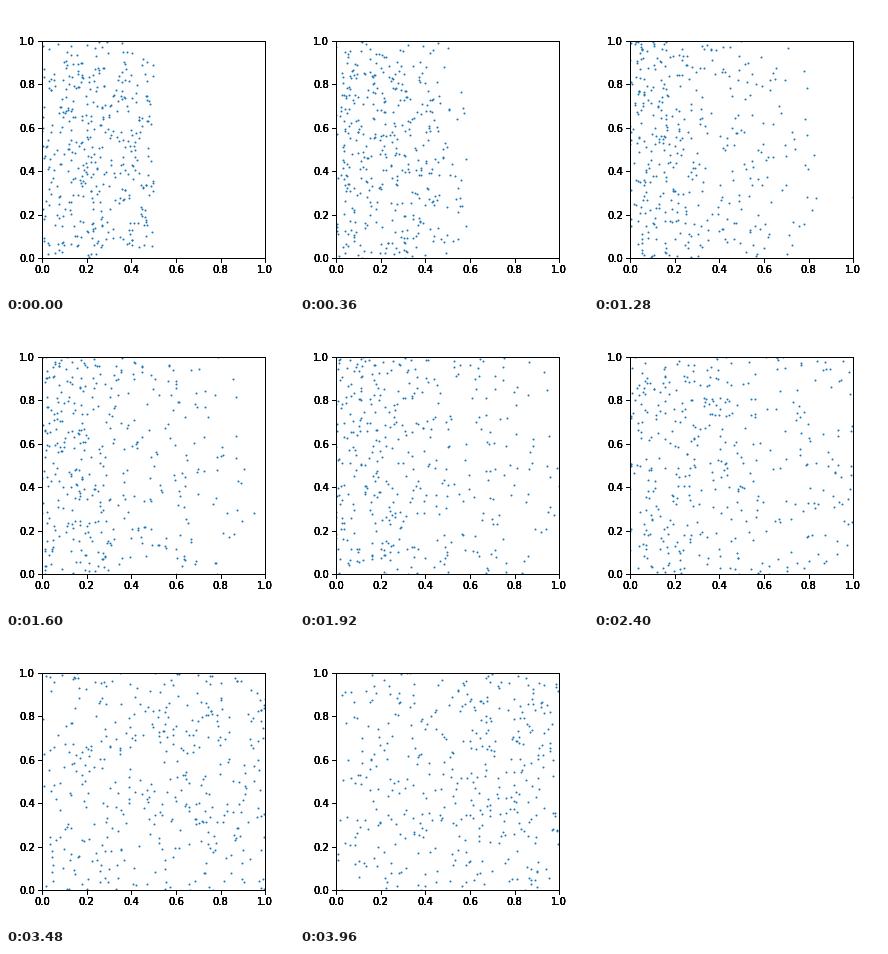
A matplotlib script that plays this animation: 288 px wide and 288 px high, repeating every 4 s.

```python
import numpy as np
import matplotlib.pyplot as plt
from matplotlib.animation import FuncAnimation

COUNT = 400
FRAMES = 100
SPEED = 0.0105      # distance per step
DIAMETER = 0.003
INK_LAYERS = 5      # repeated label passes give the heavy type

rng = np.random.default_rng(8)


def start():
    """Particles fill the left half; all but one fast one share a speed."""
    pos = rng.random((COUNT, 2)) * [0.5, 1.0]
    angle = rng.uniform(0, 2 * np.pi, COUNT)
    vel = SPEED * np.column_stack([np.cos(angle), np.sin(angle)])
    pos[0], vel[0] = (0.365, 0.267), (0.0192, 0.0036)
    return pos, vel


def collide(pos, vel):
    """Elastic collisions of equal discs that touch and approach."""
    gap = pos[:, None] - pos[None]
    near = np.triu((gap ** 2).sum(axis=2) < DIAMETER ** 2, 1)
    for i, j in np.argwhere(near):
        normal = pos[i] - pos[j]
        normal /= np.hypot(*normal)
        closing = (vel[i] - vel[j]) @ normal
        if closing < 0:
            vel[i] -= closing * normal
            vel[j] += closing * normal


def simulate():
    pos, vel = start()
    path = [pos.copy()]
    for _ in range(FRAMES - 1):
        vel[pos < 0] = np.abs(vel[pos < 0])
        vel[pos > 1] = -np.abs(vel[pos > 1])
        collide(pos, vel)
        pos += vel
        path.append(pos.copy())
    return path


def add_layer(index):
    layer = fig.add_axes(BOX, label=f"layer {index}")
    layer.set(xlim=(0, 1), ylim=(0, 1))
    layer.tick_params(width=1, length=4, pad=3, labelsize=10)
    for spine in layer.spines.values():
        spine.set_linewidth(1)
    if index:
        layer.patch.set_visible(False)
    return layer


BOX = (0.125, 0.125, 0.775, 0.755)
plt.rcParams["font.family"] = "DejaVu Sans"
fig = plt.figure(figsize=(4, 4), dpi=72, facecolor="white")
ax = [add_layer(k) for k in range(INK_LAYERS)][0]
dots, = ax.plot([], [], "o", ms=1, mew=1, color="#1f77b4")

path = simulate()


def draw(frame):
    dots.set_data(*path[frame].T)
    return dots,


anim = FuncAnimation(fig, draw, frames=FRAMES, init_func=lambda: draw(0),
                     interval=40, repeat=True, repeat_delay=0)
plt.show()
```
